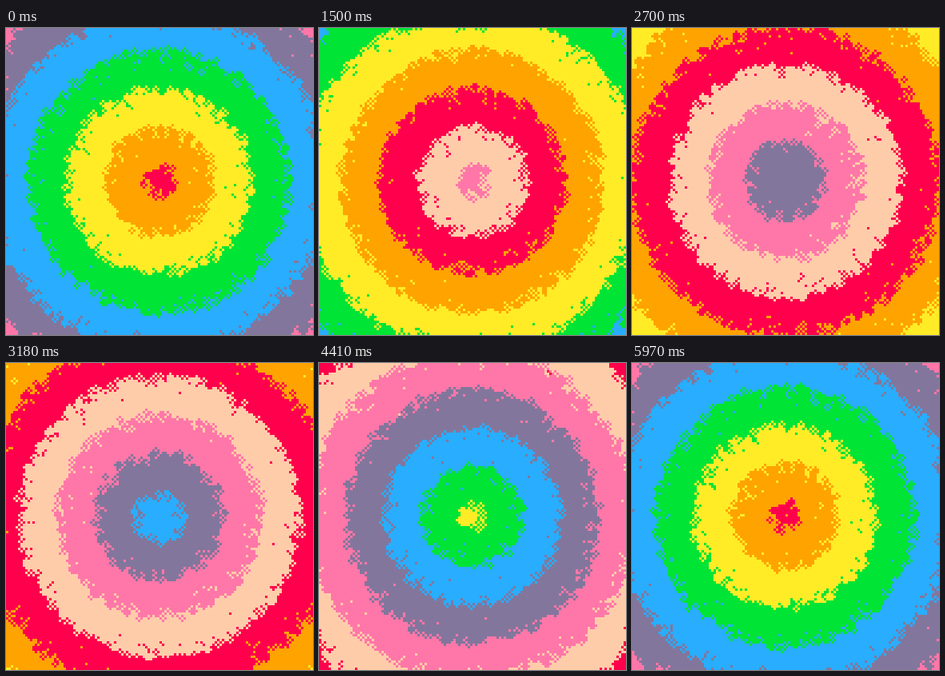
An HTML page with a canvas that plays this animation: 384x384 px, repeating every 6 s.

```html
<!DOCTYPE html>
<html>
<head>
<meta charset="utf-8">
<title>Expanding rings</title>
<style>
  html, body { margin: 0; width: 100%; height: 100%; overflow: hidden; background: #000; }
  canvas { display: block; width: 100vw; height: 100vh; image-rendering: pixelated; }
</style>
</head>
<body>
<canvas width="128" height="128"></canvas>
<script>
const SIZE = 128, HALF = SIZE / 2;
const STEP_MS = 30, STEPS = 200, STEPS_PER_COLOR = 25;
const RING = 16, DOTS = 1400, HISTORY = 30;

// red, orange, yellow, green, blue, indigo, pink, peach
const palette = [0xff004d, 0xffa300, 0xffec27, 0x00e436, 0x29adff, 0x83769c, 0xff77a8, 0xffccaa]
  .map(c => [c >> 16, c >> 8 & 255, c & 255]);

const ctx = document.querySelector('canvas').getContext('2d');
const image = ctx.createImageData(SIZE, SIZE);
const cells = new Uint8Array(SIZE * SIZE);

function random(seed) {
  let s = seed;
  return () => {
    s = s + 0x6d2b79f5 | 0;
    let t = Math.imul(s ^ s >>> 15, 1 | s);
    t = t + Math.imul(t ^ t >>> 7, 61 | t) ^ t;
    return ((t ^ t >>> 14) >>> 0) / 4294967296;
  };
}

function ringColor(x, y, step) {
  const d = Math.hypot(x - HALF, y - HALF);
  return Math.floor(d / RING + 0.5 - step / STEPS_PER_COLOR) & 7;
}

function plot(x, y, color) {
  if (x >= 0 && y >= 0 && x < SIZE && y < SIZE) cells[y * SIZE + x] = color;
}

// Scatter hollow radius-1 circles over whatever was there before.
function scatter(step) {
  const rnd = random(((step + STEPS) % STEPS + 1) * 7919);
  for (let i = 0; i < DOTS; i++) {
    const x = rnd() * SIZE, y = rnd() * SIZE;
    const color = ringColor(x, y, step), cx = x | 0, cy = y | 0;
    plot(cx - 1, cy, color);
    plot(cx + 1, cy, color);
    plot(cx, cy - 1, color);
    plot(cx, cy + 1, color);
  }
}

function draw(step) {
  for (let i = 0; i < cells.length; i++) {
    cells[i] = ringColor(i % SIZE, i / SIZE | 0, step - HISTORY);
  }
  for (let k = step - HISTORY + 1; k <= step; k++) scatter(k);
  cells.forEach((c, i) => {
    image.data.set(palette[c], i * 4);
    image.data[i * 4 + 3] = 255;
  });
  ctx.putImageData(image, 0, 0);
}

const start = performance.now();
let shown = -1;
function tick() {
  const step = Math.floor((performance.now() - start) / STEP_MS) % STEPS;
  if (step !== shown) draw(shown = step);
  requestAnimationFrame(tick);
}
tick();
</script>
</body>
</html>
```
